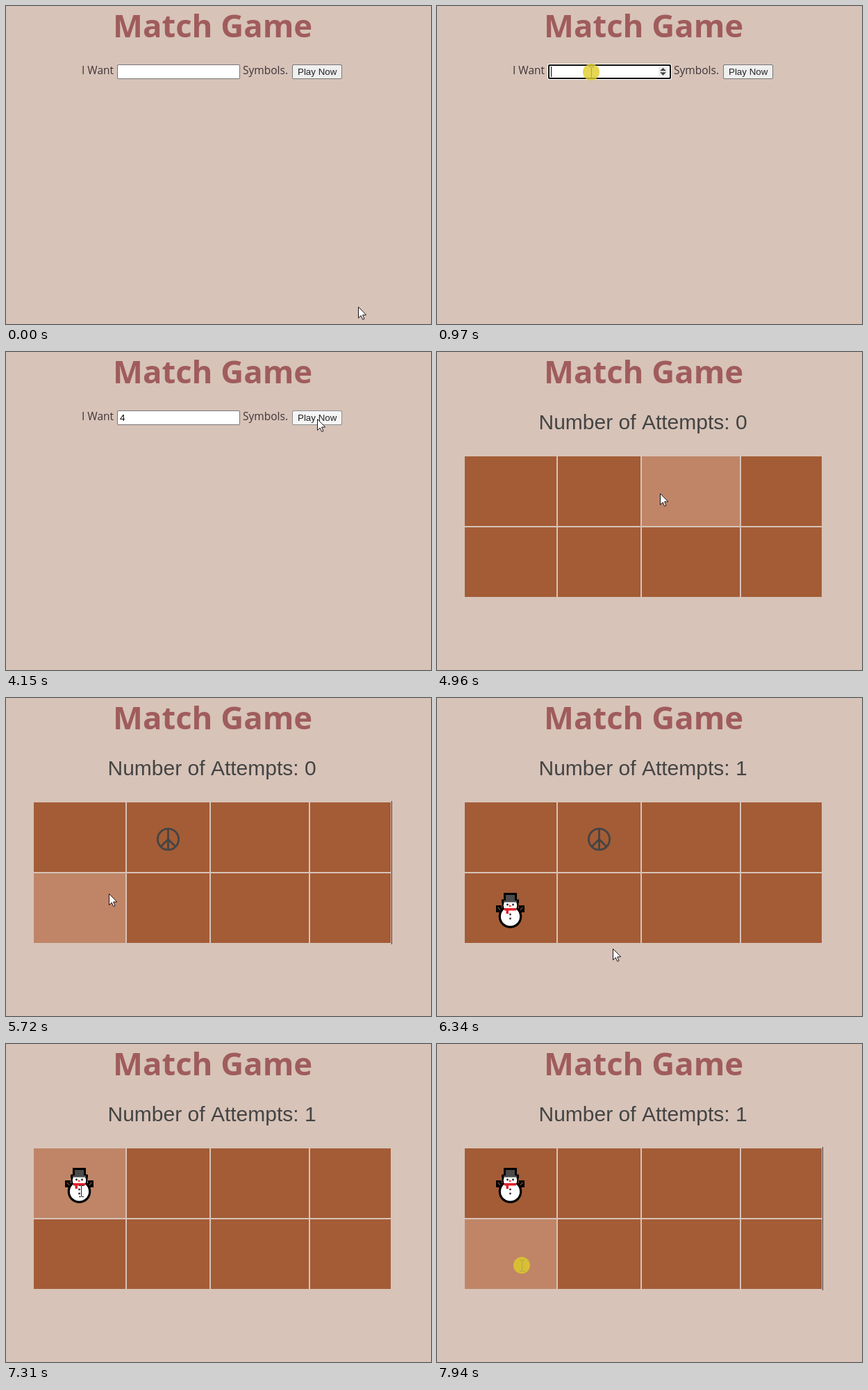
Recreate the animation shown at these times as an HTML page with a canvas. Size 612 by 457 pixels, loop 8 s.

```html
<!DOCTYPE html>
<html lang="en">
<head>
<meta charset="utf-8">
<title>Match Game</title>
<style>
html, body { margin: 0; width: 100%; height: 100%; overflow: hidden; background: #d7c3b8; }
canvas { display: block; }
</style>
</head>
<body>
<canvas id="stage" width="612" height="457"></canvas>
<script>
const ctx = document.getElementById('stage').getContext('2d');
const LOOP = 8000, STEP = 70, BLINK = 530, PRESS = 140;
const INK = '#444', CARD = '#a35c36', CARD_HOVER = '#bf8566';
const UI = '"Liberation Sans", Arial, sans-serif';
const LABEL = '"Open Sans", "Noto Sans", sans-serif';

// Mouse presses, and the other moments that change the page
const press = { focus: 900, submit: 4020, peace: 5430, snowLow: 5850, snowTop: 7050, again: 7940 };
const TYPE = 2960, DEAL = 4220, HIDE = 6490;
const released = (t, name) => t >= press[name] + PRESS;

// Pointer moves: each eases from the last resting place to `to`, bent towards `via`
const moves = [
  { start: 0, end: 830, via: [300, 20], to: [222, 95] },
  { start: 2840, end: 3680, via: [335, 112], to: [448, 101] },
  { start: 3680, end: 3820, to: [448, 96] },
  { start: 4680, end: 5310, via: [263, 274], to: [234, 215] },
  { start: 5510, end: 5820, to: [120, 302] },
  { start: 5980, end: 6340, to: [253, 360] },
  { start: 6400, end: 6890, via: [273, 232], to: [107, 205] },
  { start: 7240, end: 7730, to: [122, 318] }
];

const columns = [[40, 132], [174, 119], [295, 141], [438, 116]];
const cards = [150, 252].flatMap(y => columns.map(([x, w]) => ({ x, y, w, h: 100 })));

const inside = (p, x, y, w, h) => p.x >= x && p.x < x + w && p.y >= y && p.y < y + h;
const blinkOn = (t, from) => t >= from && Math.floor((t - from) / BLINK) % 2 === 0;
const smooth = u => u * u * (3 - 2 * u);

function pointer(t) {
  let from = [507, 432], pos = from;
  for (const { start, end, via, to } of moves) {
    if (t < start) break;
    const gone = t >= end ? end - start : Math.floor((t - start) / STEP) * STEP;
    const s = smooth(gone / (end - start)), r = 1 - s;
    pos = to.map((b, k) => {
      const bend = via ? via[k] : (from[k] + b) / 2;
      return r * r * from[k] + 2 * r * s * bend + s * s * b;
    });
    from = to;
  }
  return { x: Math.round(pos[0]), y: Math.round(pos[1]) };
}

function rect(x, y, w, h, color) {
  ctx.fillStyle = color;
  ctx.fillRect(x, y, w, h);
}

function box(x, y, w, h, r, color) {
  ctx.fillStyle = color;
  ctx.beginPath();
  ctx.roundRect(x, y, w, h, r);
  ctx.fill();
}

function disc(x, y, r, color) {
  ctx.fillStyle = color;
  ctx.beginPath();
  ctx.arc(x, y, r, 0, 7);
  ctx.fill();
}

function poly(points, color) {
  ctx.fillStyle = color;
  ctx.beginPath();
  points.forEach(([x, y]) => ctx.lineTo(x, y));
  ctx.closePath();
  ctx.fill();
}

function line(points, color, width) {
  ctx.strokeStyle = color;
  ctx.lineWidth = width;
  ctx.beginPath();
  points.forEach(([x, y]) => ctx.lineTo(x, y));
  ctx.stroke();
}

function text(str, x, y, font, color = INK) {
  ctx.font = font;
  ctx.fillStyle = color;
  ctx.fillText(str, x, y);
}

function drawForm(t, p) {
  for (const [word, x] of [['I Want', 109], ['Symbols.', 341]])
    text(word, x, 98, '15.5px ' + LABEL, '#40343a');

  const focused = t >= press.focus && t < press.submit;
  if (focused) {
    box(159, 83, 179, 23, 3, '#fff');
    box(160, 84, 177, 21, 2, '#101010');
    box(162, 86, 173, 17, 1, '#fff');
  } else {
    box(160, 84, 177, 21, 2, '#767676');
    box(161, 85, 175, 19, 1, '#fff');
  }
  if (focused || inside(p, 160, 84, 177, 21)) {
    rect(319, 87, 13, 15, '#efefef');
    for (const s of [-1, 1])
      poly([[321, 94.2 + s], [325.5, 94.2 + s * 5.5], [330, 94.2 + s]], INK);
  }
  const typed = t >= TYPE;
  if (typed) text('4', 164, 99, '13.333px ' + UI, '#000');
  if (focused && blinkOn(t, typed ? TYPE : 970)) rect(typed ? 171 : 164, 87, 1, 15, '#000');

  const hover = inside(p, 412, 84, 72, 21), pressed = t >= press.submit;
  box(412, 84, 72, 21, 2.5, pressed ? '#8d8d8d' : hover ? '#4f4f4f' : '#767676');
  box(413, 85, 70, 19, 1.5, pressed ? '#f5f5f5' : hover ? '#e5e5e5' : '#efefef');
  text('Play Now', 420, 99, '13.333px ' + UI, '#222');
}

function drawPeace(x, y) {
  ctx.strokeStyle = INK;
  ctx.lineWidth = 2.8;
  ctx.beginPath();
  ctx.arc(x, y, 15.1, 0, 7);
  ctx.stroke();
  line([[x, y - 15], [x, y + 15]], INK, 2.8);
  line([[x - 10.5, y + 10.5], [x, y], [x + 10.5, y + 10.5]], INK, 2.8);
}

function drawSnowman(x, y) {
  ctx.save();
  ctx.translate(x, y);
  for (const s of [-1, 1]) {
    line([[s * 11, 5], [s * 18, -1]], '#000', 7);
    rect(s * 16.5 - 4, -5, 8, 10, '#000');
    line([[s * 11, 5], [s * 18, -2]], '#6b4a3c', 1.5);
  }
  disc(0, 11, 16.8, '#000');
  disc(0, -6, 12, '#000');
  rect(-9.5, -23, 19, 12, '#000');
  rect(-12.5, -13.5, 25, 5, '#000');
  disc(0, 11, 13.6, '#fff');
  disc(0, -5, 9.8, '#fff');
  rect(-6.5, -20, 13, 8, '#4b4b4b');
  rect(-9.5, -12, 19, 2.5, '#4b4b4b');
  for (const s of [-1, 1]) {
    disc(s * 4, -6, 1.4, '#222');
    disc(0, 11 + s * 3, 1.4, '#3a2a2a');
  }
  poly([[-1.5, -6], [2, -4], [-1.5, -2.5]], '#e2402f');
  rect(-8.5, -1, 17, 3.5, '#e0202c');
  rect(-6, 1, 3.5, 6, '#e0202c');
  ctx.restore();
}

function drawBoard(t, p) {
  const tries = released(t, 'snowLow') ? 1 : 0;
  text('Number of Attempts: ' + tries, 146.5, 111, '30px ' + UI);
  for (const c of cards)
    rect(c.x, c.y, c.w, c.h, inside(p, c.x, c.y, c.w, c.h) ? CARD_HOVER : CARD);
  if (t < HIDE) {
    if (released(t, 'peace')) drawPeace(233.5, 203);
    if (tries) drawSnowman(105.5, 303);
  }
  if (released(t, 'snowTop')) drawSnowman(105.5, 201);
  // The text caret stands by the heading until the first card is pressed
  if (t < press.peace) {
    if (blinkOn(t, DEAL)) rect(148, 84, 1, 34, INK);
  } else if (blinkOn(t, press.peace)) rect(555, 148, 1, 206, '#4a3a34');
}

function overText(t, p) {
  if (t < DEAL) return inside(p, 110, 84, 297, 20);
  return cards.some(c => inside(p, c.x + c.w / 2 - 20, c.y + 25, 40, 54));
}

function drawPointer(t, p) {
  const click = Object.values(press).some(at => t >= at && t < at + PRESS - 10);
  if (click) disc(p.x, p.y, 12, 'rgba(222,204,40,.8)');
  ctx.save();
  ctx.translate(p.x, p.y);
  if (overText(t, p)) {
    const color = click ? '#aaa64c' : '#1c1c1c';
    rect(0, -7, 1, 15, color);
    for (const y of [-8, 8])
      for (const x of [-3, 1]) rect(x, y, 3, 1, color);
  } else {
    const arrow = [[0.5, 0.5], [0.5, 16.5], [4.2, 13], [6.7, 18.5], [9, 17.5], [6.6, 12], [11.7, 12], [0.5, 0.5]];
    poly(arrow, '#fff');
    line(arrow, '#1c1418', 1);
  }
  ctx.restore();
}

function draw(now) {
  const t = now % LOOP, p = pointer(t);
  rect(0, 0, 612, 457, '#d7c3b8');
  text('Match Game', 154, 44.5, '700 45.5px ' + LABEL, '#a05c5c');
  if (t < DEAL) drawForm(t, p);
  else drawBoard(t, p);
  drawPointer(t, p);
}

const begin = performance.now();
function tick() {
  draw(performance.now() - begin);
  requestAnimationFrame(tick);
}
tick();
</script>
</body>
</html>
```
